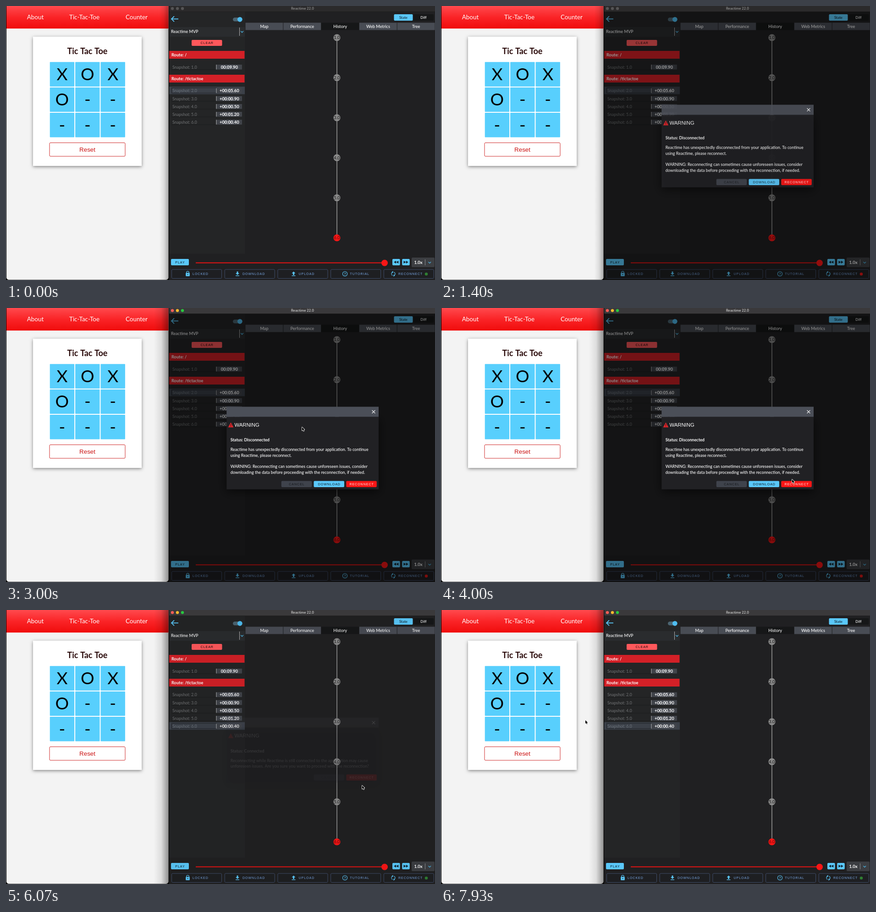
Animation, 936 px wide and 598 px high, one loop 8000 ms. Source, as an HTML page with a canvas:

```html
<!DOCTYPE html>
<html lang="en">
<head>
<meta charset="utf-8">
<title>Reconnect demo</title>
<style>
  html, body { margin: 0; width: 100%; height: 100%; overflow: hidden; background: #000; }
  canvas { display: block; }
</style>
</head>
<body>
<canvas id="stage" width="936" height="598"></canvas>
<script>
const ctx = document.getElementById('stage').getContext('2d');
const LOOP = 8000, WARN_AT = 1260, FOCUS_AT = 3000, RECONNECT_AT = 5950;
const CYAN = '#5ac8fa', RED = '#d32027', BRIGHT = '#f91616', SLATE = '#484c54';
const UI = 'Lato, sans-serif', CAPS = '"Liberation Sans", Arial, sans-serif';

function box(x, y, w, h, fill, radius = 0) {
  ctx.fillStyle = fill;
  ctx.beginPath();
  ctx.roundRect(x, y, w, h, radius);
  ctx.fill();
}

function frame(x, y, w, h, color, radius = 0) {
  ctx.strokeStyle = color;
  ctx.lineWidth = 1;
  ctx.beginPath();
  ctx.roundRect(x, y, w, h, radius);
  ctx.stroke();
}

function disc(x, y, r, fill) {
  ctx.fillStyle = fill;
  ctx.beginPath();
  ctx.arc(x, y, r, 0, 7);
  ctx.fill();
}

function trace(points, close) {
  ctx.beginPath();
  points.forEach(([x, y]) => ctx.lineTo(x, y));
  if (close) ctx.closePath();
}

function line(points, color, width = 1) {
  trace(points);
  ctx.strokeStyle = color;
  ctx.lineWidth = width;
  ctx.stroke();
}

function shape(points, fill) {
  trace(points, true);
  ctx.fillStyle = fill;
  ctx.fill();
}

function text(str, x, y, size, color, { weight = 400, align = 'left', family = UI, gap = 0 } = {}) {
  ctx.font = `${weight} ${size}px ${family}`;
  ctx.letterSpacing = gap + 'px';
  ctx.textAlign = align;
  ctx.fillStyle = color;
  ctx.fillText(str, x, y);
}

const caps = (str, x, y, color, align = 'left') =>
  text(str, x, y, 7, color, { family: CAPS, gap: 1, align });

function button(label, x, y, w, h, fill, color) {
  box(x, y, w, h, fill, 2);
  caps(label, x + w / 2 + 0.5, y + h / 2 + 2.5, color, 'center');
}

function gradient(x0, y0, x1, y1, ...colors) {
  const g = ctx.createLinearGradient(x0, y0, x1, y1);
  colors.forEach((c, i) => g.addColorStop(i / (colors.length - 1), c));
  return g;
}

function withShadow(color, blur, dy, draw) {
  ctx.save();
  ctx.shadowColor = color;
  ctx.shadowBlur = blur;
  ctx.shadowOffsetY = dy;
  draw();
  ctx.restore();
}

const clamp = v => Math.min(1, Math.max(0, v));
const smooth = v => v * v * (3 - 2 * v);

// cubic-bezier(.4, 0, .2, 1)
function standardEase(x) {
  let lo = 0, hi = 1;
  for (let i = 0; i < 16; i++) {
    const u = (lo + hi) / 2, v = 1 - u;
    if (1.2 * v * v * u + 0.6 * v * u * u + u * u * u < x) lo = u; else hi = u;
  }
  return lo * lo * (3 - 2 * lo);
}

function drawGame(active) {
  box(1, -8, 353.5, 605.5, '#f3f3f3', 5);
  box(1, 0, 353.5, 49, gradient(0, 0, 0, 49, '#ff4a4e', '#fa2427', '#f00c0c'));
  box(1, 49, 353.5, 1, '#f9c4c4');
  text('About', 64, 29, 13.4, '#fff', { align: 'center' });
  text('Tic-Tac-Toe', 171, 29, 13.4, '#fff', { align: 'center' });
  text('Counter', 285, 29, 13.4, '#fff', { align: 'center' });

  withShadow('rgba(0,0,0,.45)', 7, 2, () => box(59, 67, 237, 282, '#fff'));
  text('Tic Tac Toe', 177.5, 105, 18, '#2a0a0a', { weight: 700, align: 'center' });
  [...'XOXO-----'].forEach((mark, i) => {
    const x = 95.7 + (i % 3) * 55.4, y = 122.3 + Math.floor(i / 3) * 55.4;
    box(x, y, 53.4, 53.4, '#58cffd', 1);
    text(mark, x + 26.7, y + 39.7, 37, '#000', { align: 'center' });
  });
  frame(95, 298.5, 165, 29.5, '#cf2a2a', 2);
  text('Reset', 177.5, 318, 13.4, '#cc1414', { align: 'center', family: CAPS });

  const reach = active ? 32 : 20;
  box(354.5 - reach, 0, reach, 597, gradient(354.5 - reach, 0, 354.5, 0,
    'rgba(0,0,0,0)', 'rgba(0,0,0,.09)', `rgba(0,0,0,${active ? 0.4 : 0.3})`));
}

function drawTitleBar(active) {
  box(356, 0, 580, 12.5, active ? '#3a393b' : '#2b2a2b');
  const lights = active ? ['#fe5f57', '#febc2e', '#28c840'] : ['#565556', '#565556', '#565556'];
  lights.forEach((c, i) => disc(363 + i * 11, 5.5, 3.2, c));
  text('Reactime 22.0', 647, 8, 7.2, active ? '#c4c4c4' : '#8c8c8c',
    { weight: 600, align: 'center', family: 'Inter, sans-serif' });
}

function chevron(x, y) {
  line([[x - 2.8, y - 1.5], [x, y + 1.4], [x + 2.8, y - 1.5]], '#4db4e2', 1.3);
}

function snapshotRow(index, y, time, selected) {
  if (selected) {
    box(356, y - 9, 165, 16.5, '#3b4048');
    frame(361.5, y - 6.5, 97.5, 11.5, '#202328');
  } else {
    box(361, y + 5, 98, 1, '#1b1c1d');
  }
  text(`Snapshot: ${index}.0`, 363, y + 3.3, 9, selected ? '#6d747d' : '#717375');
  box(459, y - 5.5, 56, 10.5, gradient(459, 0, 515, 0, '#3c3f45', '#51555d', '#3f4248'));
  box(458.5, y - 5.5, 1, 10.5, '#b9bbbe');
  text(time, 487.3, y + 3.3, 9.4, '#fff', { weight: 700, align: 'center' });
}

function drawSidebar(selected) {
  box(356, 12.5, 165.5, 528, '#242526');
  line([[376, 28.3], [361, 28.3]], CYAN, 1.8);
  line([[367, 22.5], [361, 28.3], [367, 34.2]], CYAN, 1.8);
  box(495, 25.2, 18, 8.4, '#4c6572', 4.2);
  disc(510.3, 29.3, 5.4, '#4fbdf0');

  box(357, 46, 164, 21, '#2a2c2e');
  text('Reactime MVP', 360, 59, 9.1, '#fff', { weight: 500 });
  box(509, 47, 1, 18, '#b4b6b8');
  chevron(515, 56.3);
  button('CLEAR', 405, 74, 66.5, 13, '#ff585b', '#1a0a0a');

  [['/', 98], ['/tictactoe', 150]].forEach(([path, y]) => {
    box(356, y, 164.5, 17, RED);
    text('Route: ' + path, 361, y + 11.8, 9.2, '#fff', { weight: 700 });
  });
  snapshotRow(1, 133.5, '00:09.90');
  ['+00:05.60', '+00:00.90', '+00:00.50', '+00:01.20', '+00:00.40'].forEach((time, i) =>
    snapshotRow(i + 2, 185 + i * 17.2, time, selected === i + 2));
}

function drawHistory() {
  button('', 846.5, 18, 41, 14, CYAN, '#000');
  text('State', 867, 27.8, 8, '#10222c', { weight: 500, align: 'center' });
  box(888.5, 18, 45, 14, '#161718', 2);
  text('Diff', 911, 27.8, 8, '#fff', { weight: 500, align: 'center' });

  ['Map', 'Performance', 'History', 'Web Metrics', 'Tree'].forEach((label, i) => {
    const x = 522.5 + i * 82.8;
    box(x, 36.5, 81.8, 16, label === 'History' ? '#161718' : SLATE);
    text(label, x + 41, 47.6, 9.2, '#fff', { weight: 500, align: 'center' });
  });

  box(721, 69, 2, 437, '#7d7d7d');
  for (let i = 0; i < 6; i++) {
    const y = 69 + i * 87.4;
    disc(722, y, 7.6, i === 5 ? BRIGHT : '#8b8b8b');
    text(`${i + 1}.0`, 722, y + 3.3, 9.5, i === 5 ? '#5a0505' : '#151515', { align: 'center' });
  }
}

function doubleArrow(x, dir) {
  box(x - 8.3, 552, 16.6, 14, CYAN, 2);
  for (const dx of [-2.6, 2.6])
    shape([[x + dx + dir * 2.6, 559], [x + dx - dir * 2.4, 556], [x + dx - dir * 2.4, 562]], '#10202a');
}

const icons = {
  LOCKED(x) {
    box(x - 4.3, 582.5, 8.6, 7.2, CYAN, 1);
    line([[x - 2.6, 583], [x - 2.6, 580.5], [x - 1.3, 579], [x + 1.3, 579], [x + 2.6, 580.5], [x + 2.6, 583]], CYAN, 1.2);
    disc(x, 586, 1, '#1f2023');
  },
  DOWNLOAD(x) {
    box(x - 1.5, 579.5, 3, 4, CYAN);
    shape([[x - 4, 583], [x + 4, 583], [x, 587]], CYAN);
    box(x - 4, 588, 8, 1.3, CYAN);
  },
  UPLOAD(x) {
    box(x - 1.5, 583, 3, 4, CYAN);
    shape([[x - 4, 583.5], [x + 4, 583.5], [x, 579.5]], CYAN);
    box(x - 4, 588, 8, 1.3, CYAN);
  },
  TUTORIAL(x) {
    ctx.strokeStyle = CYAN;
    ctx.lineWidth = 1.1;
    ctx.beginPath();
    ctx.arc(x, 584.5, 5, 0, 7);
    ctx.stroke();
    text('?', x, 587.5, 8, CYAN, { weight: 700, align: 'center' });
  },
  RECONNECT(x) {
    ctx.strokeStyle = CYAN;
    ctx.lineWidth = 1.2;
    for (const start of [1.9, 5.04]) {
      ctx.beginPath();
      ctx.arc(x, 584.5, 4, start, start + 2.4);
      ctx.stroke();
    }
    shape([[x - 0.5, 578.2], [x - 0.5, 583], [x - 3.3, 580.6]], CYAN);
    shape([[x + 0.5, 586], [x + 0.5, 590.8], [x + 3.3, 588.4]], CYAN);
  }
};

function drawFooter(connected) {
  button('PLAY', 360, 552, 39, 14, CYAN, '#0c1a22');
  box(414, 559.5, 412, 2, '#e81212');
  disc(826, 560.7, 7, BRIGHT);
  doubleArrow(851.3, -1);
  doubleArrow(872.5, 1);
  box(885, 549, 50, 21, '#3c3e42', 2);
  text('1.0x', 890.5, 563, 9.5, '#fff', { weight: 700 });
  box(914, 553, 1, 13, '#8a8c90');
  chevron(924.3, 560);

  // label, icon x, label x
  [['LOCKED', 396.5, 407], ['DOWNLOAD', 505, 516], ['UPLOAD', 627.5, 638.5],
   ['TUTORIAL', 739.5, 750.5], ['RECONNECT', 845, 856]].forEach(([label, iconX, labelX], i) => {
    const x = 361.5 + i * 115.7;
    box(x, 575, 109, 19.5, '#1e1f22', 2);
    frame(x, 575, 109, 19.5, '#3f4d69', 2);
    icons[label](iconX);
    caps(label, labelX, 586.7, '#79a8e6');
  });
  disc(917, 585, 3.3, connected ? '#2f7d32' : '#e01818');
}

function drawDialog(connected, alpha) {
  const top = connected ? 234.8 : 215.5, bottom = connected ? 377 : 395.8;
  ctx.save();
  ctx.globalAlpha = alpha;
  ctx.beginPath();
  ctx.rect(356, 12.5, 580, 586);
  ctx.clip();
  withShadow('rgba(0,0,0,.6)', 20, 5, () => box(481.3, top + 22, 331.7, bottom - top - 22, '#212124'));
  box(481.3, top, 331.7, 22, '#4b4f58');
  line([[798.6, top + 7.6], [805.4, top + 14.4]], '#f2f2f2', 1.3);
  line([[805.4, top + 7.6], [798.6, top + 14.4]], '#f2f2f2', 1.3);

  shape([[490.5, top + 34.3], [496.3, top + 45], [484.7, top + 45]], '#e0262b');
  box(490, top + 38, 1.1, 3.6, '#241012');
  box(490, top + 42.5, 1.1, 1.1, '#241012');
  text('WARNING', 498.5, top + 43.5, 11.3, '#fff', { family: CAPS });
  text('Status: ' + (connected ? 'Connected' : 'Disconnected'), 489.7, top + 75.7, 9.1, '#fff', { weight: 700 });

  const say = (str, dy) => text(str, 489.7, top + dy, 9, '#fff', { weight: 500 });
  if (connected) {
    say('Reconnecting while Reactime is still connected to the application may cause', 96.7);
    say('unforeseen issues. Are you sure you want to proceed with the reconnection?', 108.8);
    button('CANCEL', 671.5, bottom - 18, 66.5, 13.3, '#3f434c', '#14161a');
  } else {
    say('Reactime has unexpectedly disconnected from your application. To continue', 96.7);
    say('using Reactime, please reconnect.', 109.5);
    say('WARNING: Reconnecting can sometimes cause unforeseen issues, consider', 133.8);
    say('downloading the data before proceeding with the reconnection, if needed.', 146.6);
    button('CANCEL', 600.8, bottom - 18.3, 66.4, 13.6, '#3f434c', '#14161a');
    button('DOWNLOAD', 671.5, bottom - 18.3, 66.5, 13.6, CYAN, '#0c1a22');
  }
  button('RECONNECT', 742.3, bottom - 18.3, 66.5, 13.6, BRIGHT, '#ffe9e9');
  ctx.restore();
}

// time, x, y
const pointerPath = [
  [2130, 345, 368], [2850, 646, 260], [3150, 646, 260], [3900, 766, 374],
  [4030, 766, 374], [4550, 777, 383], [6600, 777, 383], [7750, 315, 240.5], [8000, 315, 240.5]
];

function drawPointer(t) {
  const next = pointerPath.findIndex(p => p[0] > t);
  if (next < 1) return;
  const [t0, x0, y0] = pointerPath[next - 1], [t1, x1, y1] = pointerPath[next];
  const k = smooth((t - t0) / (t1 - t0));
  ctx.save();
  ctx.translate(x0 + (x1 - x0) * k, y0 + (y1 - y0) * k);
  trace([[0, 0], [0, 7.6], [1.8, 6], [3, 8.8], [4.3, 8.2], [3.1, 5.5], [5.4, 5.4]], true);
  ctx.lineJoin = 'round';
  ctx.strokeStyle = '#fff';
  ctx.lineWidth = 1.5;
  ctx.stroke();
  ctx.fillStyle = '#000';
  ctx.fill();
  ctx.restore();
}

function draw(t) {
  const active = t >= FOCUS_AT;
  const reconnected = t >= RECONNECT_AT;
  const connected = t < WARN_AT || reconnected;
  const fade = reconnected
    ? 1 - standardEase(clamp((t - RECONNECT_AT) / 195))
    : standardEase(clamp((t - WARN_AT) / 225));

  box(0, 0, 936, 598, '#000');
  drawGame(active);
  box(356, 12.5, 580, 586, '#202022');
  drawTitleBar(active);
  drawSidebar(reconnected ? 6 : 2);
  drawHistory();
  drawFooter(connected);
  if (fade > 0) {
    box(356, 12.5, 580, 586, `rgba(0,0,0,${0.45 * fade})`);
    drawDialog(connected, fade);
  }
  drawPointer(t);
}

function tick() {
  draw(performance.now() % LOOP);
  requestAnimationFrame(tick);
}
tick();
</script>
</body>
</html>
```
